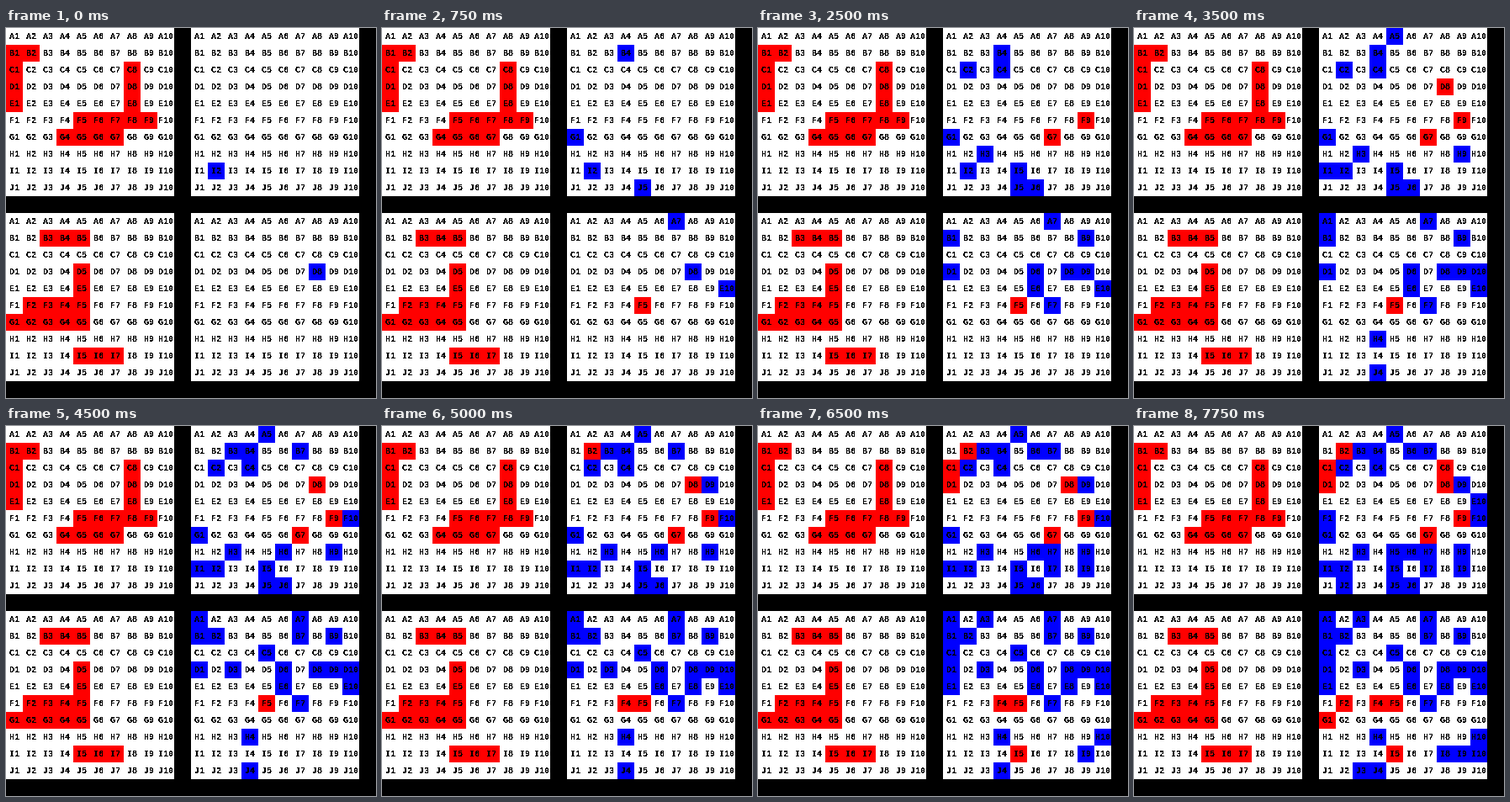
Recreate the animation shown at these times as an HTML page with a canvas. Size 440 by 440 pixels, loop 8000 ms.

```html
<!DOCTYPE html>
<html lang="en">
<head>
<meta charset="utf-8">
<title>Four boards</title>
<style>
  html, body { margin: 0; width: 100%; height: 100%; overflow: hidden; background: #000; }
  canvas { display: block; }
</style>
</head>
<body>
<canvas id="stage" width="440" height="440"></canvas>
<script>
const CELL = 20, SIZE = 10, OFFSET = 220, STEP = 250, LOOP = 8000;
const RED = '#f00', BLUE = '#00f';
const ctx = document.getElementById('stage').getContext('2d');
const words = text => text.split(' ');

// Each player has a fleet and the shots fired at it, one shot per step.
const players = [
  {
    y: 0,
    fleet: words('B1 B2 C1 D1 E1 C8 D8 E8 F5 F6 F7 F8 F9 G4 G5 G6 G7'),
    shots: words('I2 B4 G1 J5 C2 G7 I5 C4 F9 H3 J6 A5 I1 H9 D8 B7 ' +
                 'B3 F10 H6 D9 B2 C1 H7 I9 B6 I7 D1 E10 F1 H5 J2 C8')
  },
  {
    y: OFFSET,
    fleet: words('B3 B4 B5 D5 E5 F2 F3 F4 F5 G1 G2 G3 G4 G5 I5 I6 I7'),
    shots: words('D8 A7 E10 F5 D6 B9 E6 B1 D1 D9 F7 A1 H4 J4 D10 C5 ' +
                 'B2 D3 B7 F4 E8 A3 I5 H10 C1 E1 I9 F2 G1 I10 J3 I8')
  }
];

// Labels of one board, with hard pixel edges.
function makeLabels() {
  const layer = document.createElement('canvas');
  layer.width = layer.height = CELL * SIZE;
  const pen = layer.getContext('2d');
  pen.font = 'bold 10px "Liberation Mono", monospace';
  for (let row = 0; row < SIZE; row++) {
    for (let col = 0; col < SIZE; col++) {
      const label = 'ABCDEFGHIJ'[row] + (col + 1);
      const left = col * CELL + CELL / 2 - label.length * 3;
      [...label].forEach((char, i) => pen.fillText(char, left + i * 6, row * CELL + 13));
    }
  }
  const image = pen.getImageData(0, 0, layer.width, layer.height);
  for (let i = 3; i < image.data.length; i += 4) {
    image.data[i] = image.data[i] > 105 ? 255 : 0;
  }
  pen.putImageData(image, 0, 0);
  return layer;
}

const labels = makeLabels();

function drawBoard(x, y, cells, colorOf) {
  ctx.fillStyle = '#fff';
  ctx.fillRect(x, y, CELL * SIZE, CELL * SIZE);
  for (const cell of cells) {
    const row = cell.charCodeAt(0) - 65, col = cell.slice(1) - 1;
    ctx.fillStyle = colorOf(cell);
    ctx.fillRect(x + col * CELL, y + row * CELL, CELL, CELL);
  }
  ctx.drawImage(labels, x, y);
}

function draw(now) {
  const fired = Math.floor((now % LOOP) / STEP) + 1;
  ctx.fillStyle = '#000';
  ctx.fillRect(0, 0, 440, 440);
  for (const { y, fleet, shots } of players) {
    drawBoard(0, y, fleet, () => RED);
    drawBoard(OFFSET, y, shots.slice(0, fired), cell => fleet.includes(cell) ? RED : BLUE);
  }
}

function tick() {
  draw(performance.now());
  requestAnimationFrame(tick);
}
tick();
</script>
</body>
</html>
```
